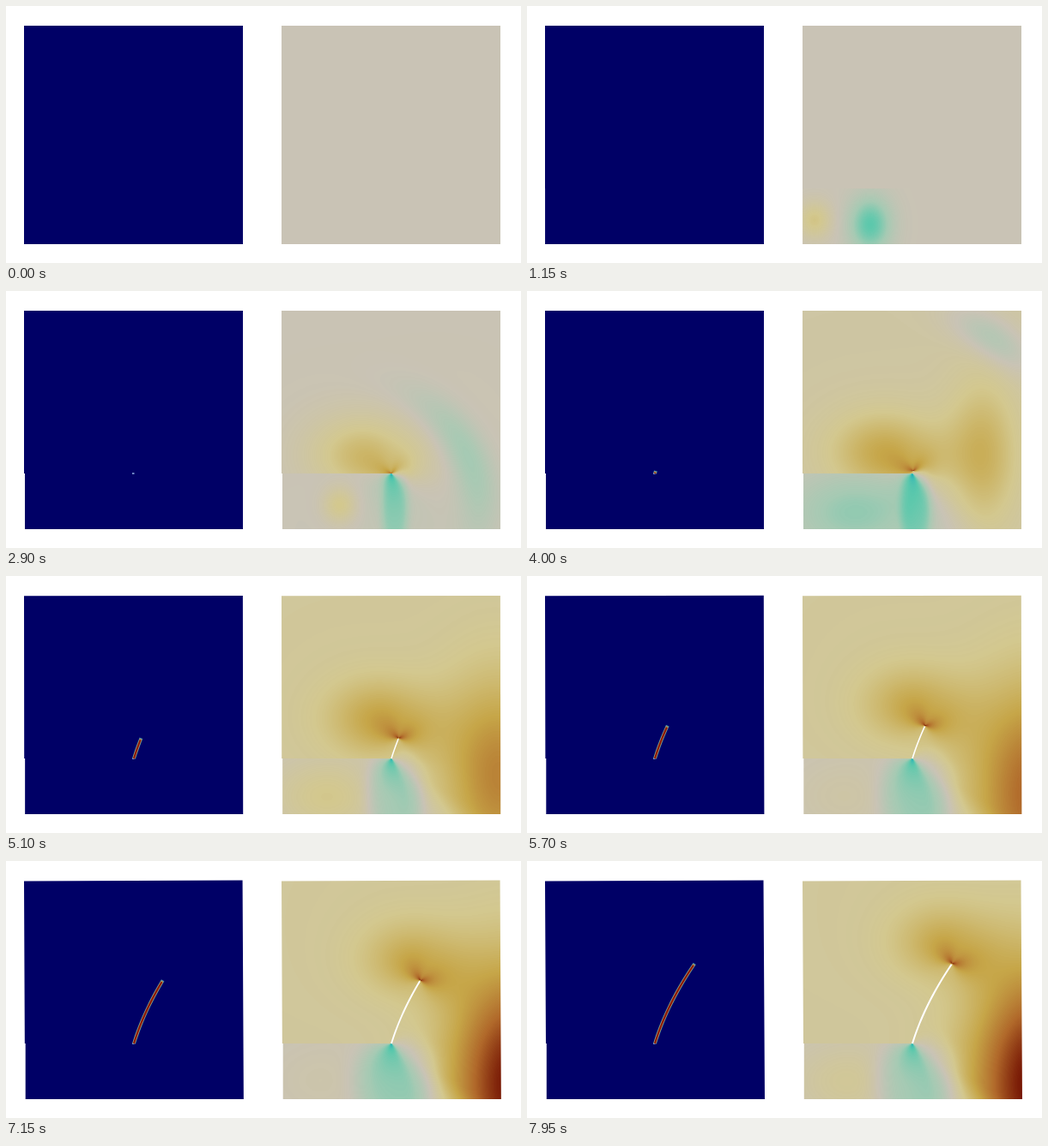
Write an HTML page with a canvas that moves like this. It is 600 by 300 pixels and loops after 8000 ms.

```html
<!DOCTYPE html>
<html lang="en">
<head>
<meta charset="utf-8">
<title>Crack growth</title>
<style>
html, body { margin: 0; width: 100%; height: 100%; overflow: hidden; background: #fff; }
canvas { display: block; }
</style>
</head>
<body>
<canvas id="stage" width="600" height="300"></canvas>
<script>
const LOOP = 8000, STEP = 50;
const SIZE = 260, LEFT = 320, TOP = 20;
const NOTCH = { x: 449, y: 213 };
const ctx = document.getElementById('stage').getContext('2d');

const clamp = (v, lo, hi) => Math.min(hi, Math.max(lo, v));
const mix = (a, b, u) => a + (b - a) * u;
const smooth = (lo, hi, v) => {
  const u = clamp((v - lo) / (hi - lo), 0, 1);
  return u * u * (3 - 2 * u);
};
const bell = (dx, dy, rx, ry) => Math.exp(-((dx / rx) ** 2) - (dy / ry) ** 2);

// Crack: height above the notch by time, and a slightly bent path by height.
const crackHeight = t => Math.max(3 * smooth(3500, 4000, t), .0244 * (t - 4130));
const crackPoint = h => ({ x: NOTCH.x + .31 * h + .002 * h * h, y: NOTCH.y - h });

// Colour scale from compression to tension, evenly spaced.
const palette = (() => {
  const strip = document.createElement('canvas').getContext('2d', { willReadFrequently: true });
  strip.canvas.width = 401;
  const blend = strip.createLinearGradient(0, 0, 401, 0);
  ['#0a6eaa', '#1eafb9', '#5cc8ac', '#a5cab3', '#c9c3b5', '#d3c88f', '#c6a648', '#b0682a', '#781905']
    .forEach((color, i) => blend.addColorStop(i / 8, color));
  strip.fillStyle = blend;
  strip.fillRect(0, 0, 401, 1);
  return strip.getImageData(0, 0, 401, 1).data;
})();

// The cut left of the notch separates the stresses above and below it.
const above = new Float32Array(SIZE * SIZE), below = new Float32Array(SIZE * SIZE);
for (let i = 0; i < above.length; i++) {
  const dx = LEFT + i % SIZE + .5 - NOTCH.x;
  const dy = TOP + Math.floor(i / SIZE) + .5 - NOTCH.y;
  const angle = Math.atan2(dy, dx);
  above[i] = 1 - smooth(.5, 1.3, angle);
  below[i] = dy > 0 ? 1 : 1 - smooth(0, 1.2, -angle);
}

// Ring-shaped wave: enters from the left, then spreads from its source.
function impactWave(t) {
  if (t < 850 || t > 5200) return () => 0;
  const spread = smooth(1150, 1900, t), late = smooth(2900, 4000, t);
  const sourceX = Math.min(400, 400 - (1150 - t) * .27);
  const radius = Math.max(0, (t - 1150) * .086);
  const aim = mix(.45, .95, late), width = mix(.6, .22, late);
  const strength = mix(-.5, -.28, spread) * smooth(850, 1100, t);
  return (x, y, lower) => {
    const dx = x - sourceX, dy = 255 - y;
    const ring = Math.exp(-(((Math.hypot(dx, dy * mix(.75, 1, spread)) - radius) / 24) ** 2));
    const beam = Math.exp(-(((Math.atan2(dy, dx) - aim) / width) ** 2));
    return strength * ring * mix(lower, beam, spread);
  };
}

// Stress near the moving tip, strongest to both sides of its heading.
function tipStress(tip, t) {
  const strength = .72 * smooth(1900, 2900, t);
  const heading = mix(1.7, 1.1, smooth(4000, 6300, t));
  const cos = Math.cos(heading), sin = Math.sin(heading);
  return (x, y) => {
    const dx = x - tip.x, dy = tip.y - y, r = Math.hypot(dx, dy) + .01;
    const ahead = (dx * cos + dy * sin) / r;
    return strength * (1 + ahead) / 2 * (1.7 - ahead * ahead) * Math.exp(-Math.sqrt(r / 9));
  };
}

function stressAt(t) {
  const tip = crackPoint(crackHeight(t));
  const wave = impactWave(t), tipField = tipStress(tip, t);
  const loaded = smooth(1900, 2900, t), grown = smooth(4000, 6300, t);
  const warmth = .17 * smooth(2900, 4700, t);
  const halo = loaded * mix(.3, .2, grown), lag = mix(35, 10, grown);
  const edge = smooth(3000, 3900, t) * mix(.28, .92, smooth(3700, 7600, t));
  const shift = smooth(3700, 6000, t);
  const edgeX = mix(528, 600, shift), edgeY = mix(190, 262, shift);
  const edgeW = mix(38, 82, shift), edgeH = mix(85, 130, shift);
  // Reflections make the lower left swing between tension and compression.
  const swing = .3 * smooth(3000, 3800, t) * Math.cos((t - 2850) / 2400 * 2 * Math.PI);
  const tail = .28 * smooth(950, 1150, t) * (1 - smooth(2900, 3600, t));
  const tailX = 335 + (t - 1150) * .031;
  const plumeW = mix(16, 47, smooth(3500, 6500, t));

  return (x, y, i) => {
    const upper = warmth + tipField(x, y)
      + halo * bell(x - tip.x + lag, y - tip.y + 22, 62, 46)
      + edge * bell(x - edgeX, y - edgeY, edgeW, edgeH);
    const dx = x - NOTCH.x, dy = y - NOTCH.y, r = Math.hypot(dx, dy);
    const plume = ((dx - 4) / plumeW) ** 2 + ((dy - 45) / 55) ** 2;
    const lower = swing * bell(x - 378, y - 258, 72, 48)
      + tail * bell(x - tailX, y - 250, 20, 22)
      - loaded * .28 * Math.exp(-plume * plume)
      - loaded * .85 * Math.max(0, dy / r) * Math.exp(-Math.sqrt(r / 8));
    return upper * above[i] + lower * below[i] + wave(x, y, below[i]);
  };
}

const buffer = document.createElement('canvas');
buffer.width = buffer.height = SIZE;
const bufferCtx = buffer.getContext('2d');
const image = bufferCtx.createImageData(SIZE, SIZE);

function paintField(t) {
  const stress = stressAt(t);
  for (let row = 0, i = 0; row < SIZE; row++) {
    for (let col = 0; col < SIZE; col++, i++) {
      const v = clamp(stress(LEFT + col + .5, TOP + row + .5, i), -1, 1);
      const from = Math.round((v + 1) * 200) * 4;
      for (let c = 0; c < 4; c++) image.data[i * 4 + c] = palette[from + c];
    }
  }
  bufferCtx.putImageData(image, 0, 0);
}

function plate(x, t) {
  const slide = smooth(900, 2500, t) + .8 * smooth(4000, 8000, t);
  const tilt = smooth(3800, 8200, t);
  const right = x + 255;
  ctx.beginPath();
  ctx.moveTo(x, 23 + tilt * .6);
  ctx.lineTo(right - tilt * .5, 23 - tilt * .5);
  ctx.lineTo(right + tilt, 278);
  ctx.lineTo(x + slide, 278);
  ctx.lineTo(x + slide, NOTCH.y);
  ctx.lineTo(x + tilt, NOTCH.y);
  ctx.closePath();
}

function crack(offset, height, color, width) {
  ctx.beginPath();
  for (let h = 0; h < height + 3; h += 3) {
    const p = crackPoint(Math.min(h, height));
    ctx.lineTo(p.x + offset, p.y);
  }
  ctx.strokeStyle = color;
  ctx.lineWidth = width;
  ctx.lineJoin = 'round';
  ctx.stroke();
}

function draw(t) {
  const height = crackHeight(t);
  ctx.fillStyle = '#fff';
  ctx.fillRect(0, 0, 600, 300);

  plate(21, t);
  ctx.fillStyle = '#000066';
  ctx.fill();
  if (t >= 2700) {
    ctx.fillStyle = '#6f86c4';
    ctx.fillRect(147, 212, 2.5, 2);
  }
  if (t > 3600) {
    crack(-300, height, '#4a8aa6', 4);
    crack(-300, height - 1, '#b8924c', 2.9);
    crack(-300, height - 2, '#8c1408', 2);
  }

  paintField(t);
  ctx.save();
  plate(321, t);
  ctx.clip();
  ctx.drawImage(buffer, LEFT, TOP);
  ctx.restore();
  if (t > 4100) crack(0, height - 1, '#fff', 1.3 + height / 130);
}

const start = performance.now();
let shown = -1;
function tick(now) {
  const t = Math.floor(Math.max(0, now - start) % LOOP / STEP) * STEP;
  if (t !== shown) draw(shown = t);
  requestAnimationFrame(tick);
}
tick(start);
</script>
</body>
</html>
```
